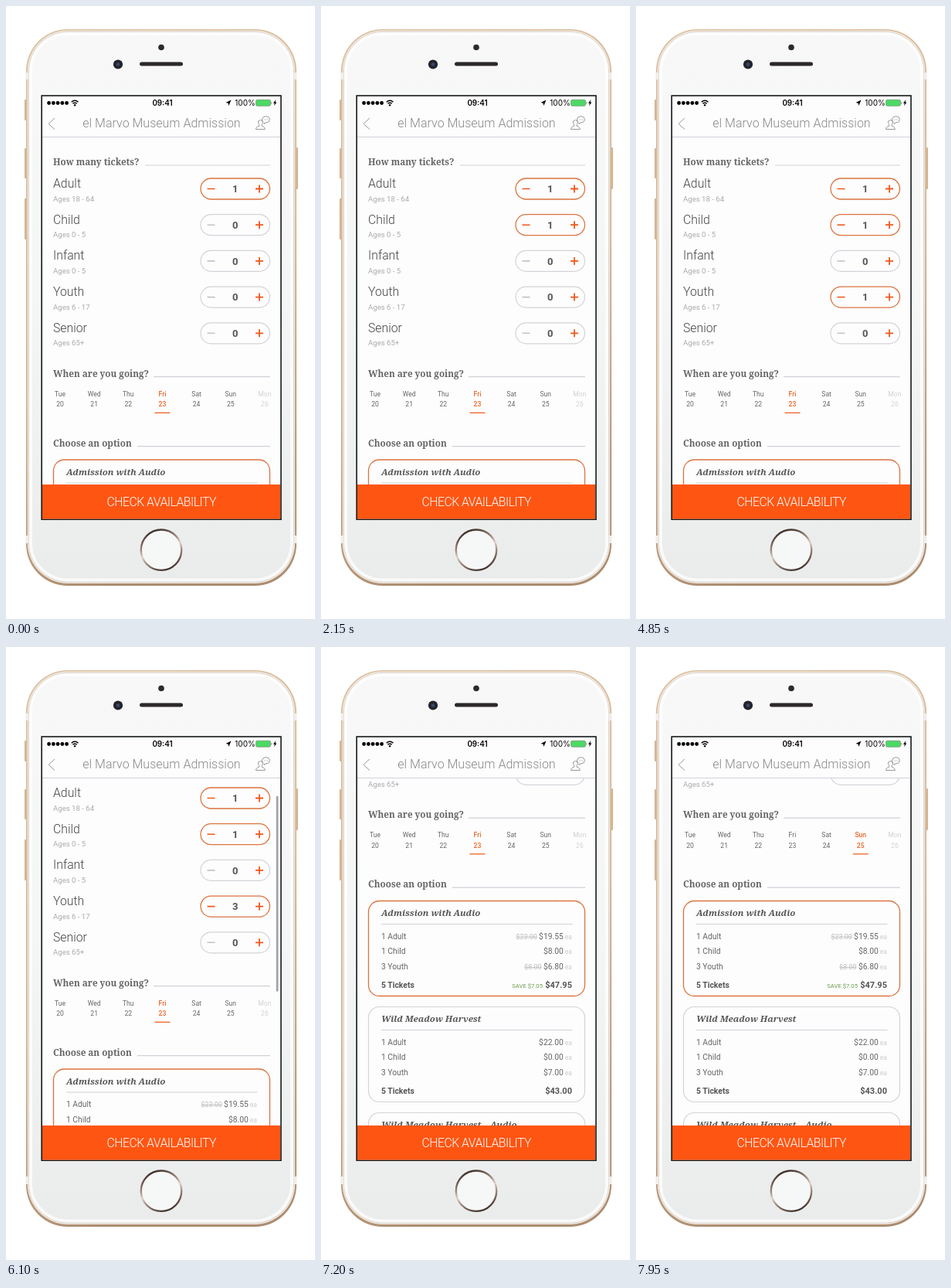
Write an HTML page that moves like this. It is 400x793 px and loops after 8000 ms.

```html
<!DOCTYPE html>
<html lang="en">
<head>
<meta charset="utf-8">
<title>Ticket booking</title>
<style>
  html, body { margin: 0; width: 100%; height: 100%; overflow: hidden; background: #fff; }
  svg { display: block; width: 100%; height: 100%; }
  text { font-family: Roboto, sans-serif; fill: #666; }
  .heading { font: bold 11.7px "Noto Serif", serif; }
  .cardTitle { font: italic bold 11.4px "Noto Serif", serif; fill: #555; }
  .kind { font-size: 15.8px; font-weight: 300; fill: #444; }
  .ages { font-size: 9.6px; fill: #aaa; }
  .item { font-size: 10.3px; }
  .strong { font-size: 10.4px; font-weight: bold; fill: #555; }
  .total { font-size: 11px; font-weight: bold; fill: #555; }
  .unit { font-size: 8.6px; fill: #ccc; }
  .old { font-size: 8.8px; fill: #bbb; text-decoration: line-through; }
  .save { font-size: 7.7px; fill: #6c9c50; }
  .count { font-size: 13px; font-weight: bold; fill: #555; }
  .mid { text-anchor: middle; }
  .end { text-anchor: end; }
  .rule { stroke: #d2d0d8; stroke-width: 1.2; }
  .pill { fill: none; stroke: #d3d3da; stroke-width: 1.2; }
  .sign { stroke: #c4c4c8; stroke-width: 1.6; }
  .plus, .on .sign { stroke: #f0581c; }
  .plus { stroke-width: 1.8; }
  .on .pill { stroke: #dc7440; stroke-width: 1.3; }
  .day text { font-size: 8.6px; }
  .day line { stroke: none; }
  .day.off text { fill: #d2d2d2; }
  .day.on text { fill: #ec6326; font-weight: 500; }
  .day.on line { stroke: #ec6326; stroke-width: 1.3; }
  .thin { fill: none; stroke: #999; stroke-width: 1; }
</style>
</head>
<body>
<svg viewBox="0 0 400 793">
  <defs>
    <clipPath id="view"><rect x="47" y="170" width="308.5" height="449"/></clipPath>
    <linearGradient id="gold" x2=".3" y2="1">
      <stop offset="0" stop-color="#dcc2a4"/><stop offset=".6" stop-color="#d3b592"/><stop offset="1" stop-color="#ab8c70"/>
    </linearGradient>
    <linearGradient id="face" x2="0" y2="1">
      <stop offset="0" stop-color="#f8f8f8"/><stop offset=".5" stop-color="#f4f5f5"/><stop offset="1" stop-color="#eaecec"/>
    </linearGradient>
    <linearGradient id="ring" x1=".3" x2=".7" y2="1">
      <stop offset="0" stop-color="#382a25"/><stop offset=".35" stop-color="#a48d80"/><stop offset=".5" stop-color="#e0d2c9"/>
      <stop offset=".65" stop-color="#a48d80"/><stop offset="1" stop-color="#382a25"/>
    </linearGradient>
  </defs>

  <g fill="#d3b592">
    <rect x="24" y="121" width="3" height="27" rx="1"/>
    <rect x="24" y="184" width="3" height="39" rx="1"/>
    <rect x="24" y="249" width="3" height="53" rx="1"/>
    <rect x="375" y="183" width="3" height="54" rx="1"/>
  </g>
  <rect x="26" y="30" width="350" height="720" rx="54" fill="url(#gold)"/>
  <rect x="27.8" y="31.5" width="346.4" height="715.5" rx="52.5" fill="#f3e8dc"/>
  <rect x="29.5" y="33.3" width="343" height="712" rx="51" fill="url(#face)" stroke="#d8d2cc"/>
  <rect x="32" y="36" width="338" height="706.5" rx="48" fill="none" stroke="#fff" stroke-width="4" opacity=".75"/>
  <g fill="#f1eeeb">
    <rect x="25.5" y="86" width="4" height="9"/><rect x="372.5" y="86" width="4" height="9"/>
    <rect x="25.5" y="685" width="4" height="10"/><rect x="372.5" y="685" width="4" height="10"/>
  </g>
  <circle cx="201" cy="53.5" r="3.8" fill="#2c2a2b"/>
  <circle cx="145" cy="75.5" r="6.1" fill="#23232b"/>
  <circle cx="145" cy="75.5" r="2.3" fill="#39486d"/>
  <rect x="173" y="72.5" width="56" height="5" rx="2.5" fill="#2d2929"/>
  <circle cx="201" cy="703.7" r="26.2" fill="#f6f7f7" stroke="url(#ring)" stroke-width="2.4"/>

  <rect x="46.2" y="116" width="309.8" height="548.2" fill="#fdfdfd" stroke="#151a19" stroke-width="1.6"/>
  <g clip-path="url(#view)">
    <g id="content"></g>
    <rect id="bar" x="349.8" width="2.6" height="253" rx="1.3" fill="#a09fa6"/>
  </g>

  <line class="rule" x1="47" x2="355" y1="169.5" y2="169.5"/>
  <g id="dots"></g>
  <g fill="none" stroke="#000" stroke-width="1.4">
    <path d="M84.7 124.2q4.4-3.8 8.8 0M86.4 126.3q2.7-2.2 5.4 0"/>
  </g>
  <circle cx="89.1" cy="128.3" r="1.2"/>
  <text class="mid" x="202.5" y="129" style="font:600 9.8px Inter,sans-serif;fill:#000">09:41</text>
  <path d="M291.5 121.5l-7 3.6 3.2.6.6 3.4z"/>
  <text x="296.3" y="129.2" style="font:10px Inter,sans-serif;fill:#000">100%</text>
  <rect x="323.5" y="121.3" width="19" height="8" rx="1.8" fill="#4cd964" stroke="#7d9a80" stroke-width=".8"/>
  <path d="M343.6 124v2.8q1.4-1.4 0-2.8zM349.5 121l-3.6 4.7h1.9l-.8 3.6 3.4-4.8h-1.9z"/>
  <path class="thin" d="M63 145l-8 7.3 8 7.3"/>
  <text class="mid" x="201.5" y="156.5" style="font-size:16px;font-weight:300;fill:#888">el Marvo Museum Admission</text>
  <path class="thin" d="M323.5 159.5q0-3.2 4.2-4.3v-1.6q-1.8-1.8-1.2-4.6 2.8-3 5.8 0 .6 2.8-1.2 4.6v1.6q4.2 1.1 4.2 4.3zM332.5 150.2q-2.6-3.5.4-6.3 3.2-2.4 7-.3 3 2.9.4 6-2.2 1.7-4.3 1.2l-1.8 2v-2.1M334.5 147h.8m1.2 0h.8m1.2 0h.8"/>

  <rect x="47" y="619" width="308" height="44.5" fill="#ff5512"/>
  <text class="mid" x="201.3" y="647" style="font-size:15.8px;font-weight:300;letter-spacing:-.5px;fill:#fff">CHECK AVAILABILITY</text>
</svg>
<script>
const LOOP = 8000, STEP = 50;
const $ = id => document.getElementById(id);
const text = (cls, x, y, s) => `<text class="${cls}" x="${x}" y="${y}">${s}</text>`;
const span = (cls, s, dx = 0) => `<tspan class="${cls}" dx="${dx}">${s}</tspan>`;
const rule = (x1, x2, y, cls = 'rule') => `<line class="${cls}" x1="${x1}" x2="${x2}" y1="${y}" y2="${y}"/>`;
const heading = (s, y, lineX) => text('heading', 61, y, s) + rule(lineX, 342, y);

function ticketRow([kind, ages], i) {
  return `<g class="ticket" transform="translate(0 ${236.5 + i * 46.7})">
    ${text('kind', 61, -1.5, kind)}${text('ages', 61, 16, 'Ages ' + ages)}
    <rect class="pill" x="252" y="-13.5" width="89.5" height="27" rx="13.5"/>
    ${rule(260.5, 270.5, 0, 'sign')}<path class="plus" d="M323 0h10M328-5v10"/>
    ${text('count mid', 296.8, 4.6, 0)}</g>`;
}

function dayCell(name, i) {
  const x = 70 + i * 44.15;
  return `<g class="day">${text('mid', x, 504.5, name)}${text('mid', x, 518, 20 + i)}
    ${rule(x - 10, x + 10, 526.3, '')}</g>`;
}

const price = (y, now, old) => text('end', 325, y,
  (old ? span('old', old) : '') + span('item', now, old ? 2.5 : 0) + span('unit', 'ea', 2));

function card({ title, prices, total, save }, i) {
  const lines = ['1 Adult', '1 Child', '3 Youth'].map((s, k) => {
    const y = 49.3 + k * 19.6;
    return text('item', 78, y, s) + price(y, ...prices[k]);
  });
  return `<g class="${i ? '' : 'on'}" transform="translate(0 ${587 + i * 137})">
    <rect class="pill" x="61.5" y="0" width="280" height="123" rx="14"/>
    ${text('cardTitle', 78, 19.6, title)}${rule(78, 325.5, 30)}${lines.join('')}
    ${text('strong', 78, 112.8, '5 Tickets')}${text('total end', 325, 112.8, total)}
    ${save ? text('save end', 287, 112.8, save) : ''}</g>`;
}

const tickets = [['Adult', '18 - 64'], ['Child', '0 - 5'], ['Infant', '0 - 5'], ['Youth', '6 - 17'], ['Senior', '65+']];
const days = ['Tue', 'Wed', 'Thu', 'Fri', 'Sat', 'Sun', 'Mon'];
const plain = { title: 'Wild Meadow Harvest', prices: [['$22.00'], ['$0.00'], ['$7.00']], total: '$43.00' };
const cards = [
  { title: 'Admission with Audio', prices: [['$19.55', '$23.00'], ['$8.00'], ['$6.80', '$8.00']], total: '$47.95', save: 'SAVE $7.05' },
  plain,
  { ...plain, title: 'Wild Meadow Harvest – Audio' }
];

$('content').innerHTML =
  heading('How many tickets?', 206, 180) + tickets.map(ticketRow).join('') +
  heading('When are you going?', 479.7, 191) + days.map(dayCell).join('') +
  heading('Choose an option', 569.7, 170) + cards.map(card).join('');
$('dots').innerHTML = [0, 1, 2, 3, 4].map(i => `<circle cx="${55.6 + i * 5.75}" cy="125.5" r="2.4"/>`).join('');

const ticketNodes = [...document.querySelectorAll('.ticket')];
const dayNodes = [...document.querySelectorAll('.day')];
const clamp = v => Math.min(1, Math.max(0, v));
const taps = (t, ...times) => times.filter(at => t >= at).length;

// The drag has already moved 41px when it first shows, then eases out.
const scrollAt = t => t < 6100 ? 0 : 258.5 - 217.5 * (1 - clamp((t - 6100) / 345)) ** 3;

function draw(t) {
  const counts = [1, taps(t, 2150), 0, taps(t, 3650, 5250, 5800), 0];
  ticketNodes.forEach((node, i) => {
    node.classList.toggle('on', counts[i] > 0);
    node.querySelector('.count').textContent = counts[i];
  });
  const selected = t < 7250 ? 3 : 5;
  dayNodes.forEach((node, i) => {
    node.classList.toggle('on', i === selected);
    node.classList.toggle('off', i === 6);
  });
  const scroll = scrollAt(t);
  $('content').setAttribute('transform', `translate(0 ${-scroll})`);
  $('bar').setAttribute('y', 172 + scroll * .507);
  $('bar').setAttribute('opacity', t < 6100 ? 0 : 1 - clamp((t - 6900) / 250));
}

function tick() {
  draw(Math.floor(performance.now() % LOOP / STEP) * STEP);
  requestAnimationFrame(tick);
}
tick();
</script>
</body>
</html>
```
